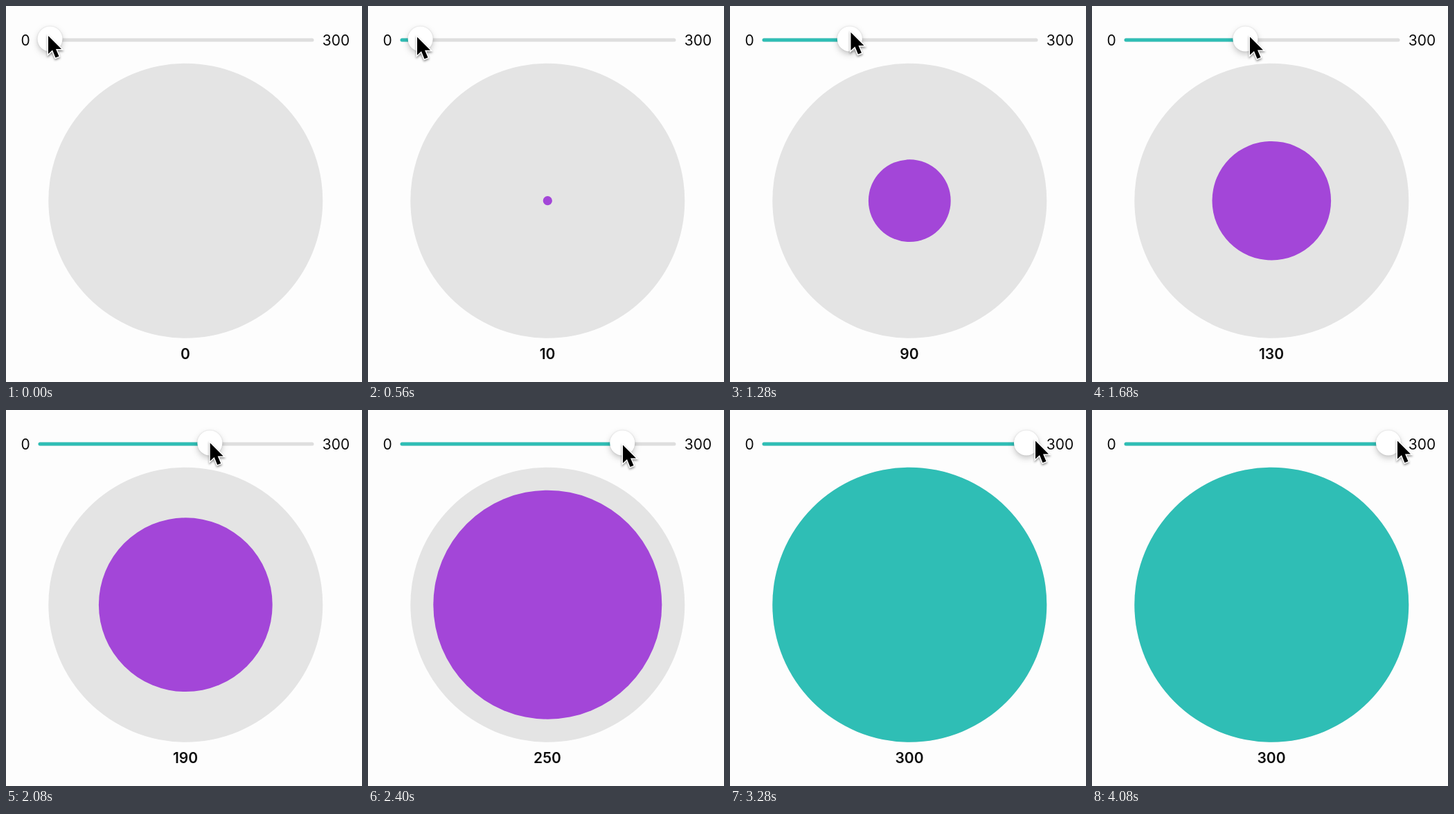
An HTML page for the animation above (4.16 s loop, 514 px wide and 542 px high).

```html
<!DOCTYPE html>
<html lang="en">
<head>
<meta charset="utf-8">
<title>Slider and circle</title>
<style>
  html, body { margin: 0; height: 100%; overflow: hidden; background: #fdfdfd; }
  svg { display: block; width: 100%; height: 100%; }
  text { font: 21px Inter, sans-serif; fill: #0c0c0c; text-anchor: middle; }
  #value { font-weight: 600; }
  #thumb { filter: drop-shadow(0 4px 5px #0003) drop-shadow(0 0 1px #0002); }
  #cursor { filter: drop-shadow(0 2px 1.5px #0006); }
</style>
</head>
<body>
<svg viewBox="0 0 514 542">
  <circle cx="259.3" cy="280.7" r="198" fill="#e4e4e4"/>
  <circle id="disc" cx="259.3" cy="280.7"/>
  <g stroke-width="5" stroke-linecap="round">
    <path d="M49 49H442" stroke="#dedede"/>
    <path id="fill" stroke="#2fbeb5"/>
  </g>
  <circle id="thumb" cy="47.5" r="18" fill="#fff"/>
  <text x="28" y="57">0</text>
  <text x="476.5" y="57">300</text>
  <text id="value" x="259" y="508.5"></text>
  <path id="cursor" d="M0 0V26L6 20.5L10.5 31.5L15.5 29.5L11 19H19Z"
        fill="#000" stroke="#fff" stroke-width="3" paint-order="stroke"/>
</svg>
<script>
const LOOP = 4160, STEP = 80, MAX = 300, RELEASE = 3120;
const $ = id => document.getElementById(id);
const disc = $('disc'), fill = $('fill'), thumb = $('thumb'), value = $('value'), cursor = $('cursor');

// Rows of [time, ...numbers]
const dragKeys = [[500, 0], [880, 50], [1040, 70], [1600, 128], [1680, 132],
                  [2160, 200], [2400, 250], [2720, 290], [2800, 300]];
const cursorKeys = [[0, 61, 43], [319, 61, 43], [320, 59, 47], [480, 59, 47], [880, 119, 35.5],
                    [1120, 153, 35.5], [1680, 228, 44.5], [2160, 308, 48], [2400, 368, 50.5],
                    [2800, 428.5, 46], [2960, 441, 44.5]];

function sample(keys, t) {
  const next = keys.findIndex(key => key[0] > t);
  if (next === 0) return keys[0].slice(1);
  if (next < 0) return keys[keys.length - 1].slice(1);
  const a = keys[next - 1], b = keys[next];
  const k = (t - a[0]) / (b[0] - a[0]);
  return a.slice(1).map((n, i) => n + (b[i + 1] - n) * k);
}

function draw(now) {
  const t = Math.floor(now % LOOP / STEP) * STEP;
  const amount = Math.round(sample(dragKeys, t)[0] / 10) * 10;
  const x = 63.5 + 364.5 * amount / MAX;
  const [cx, cy] = sample(cursorKeys, t);

  disc.setAttribute('r', 198 * amount / MAX);
  disc.setAttribute('fill', t < RELEASE ? '#a346d8' : '#2fbeb5');
  fill.setAttribute('d', `M49 49H${x}`);
  fill.setAttribute('visibility', amount ? 'visible' : 'hidden');
  thumb.setAttribute('cx', x);
  value.textContent = amount;
  cursor.setAttribute('transform', `translate(${cx} ${cy})`);
}

const start = performance.now();
function tick() {
  draw(performance.now() - start);
  requestAnimationFrame(tick);
}
tick();
</script>
</body>
</html>
```
